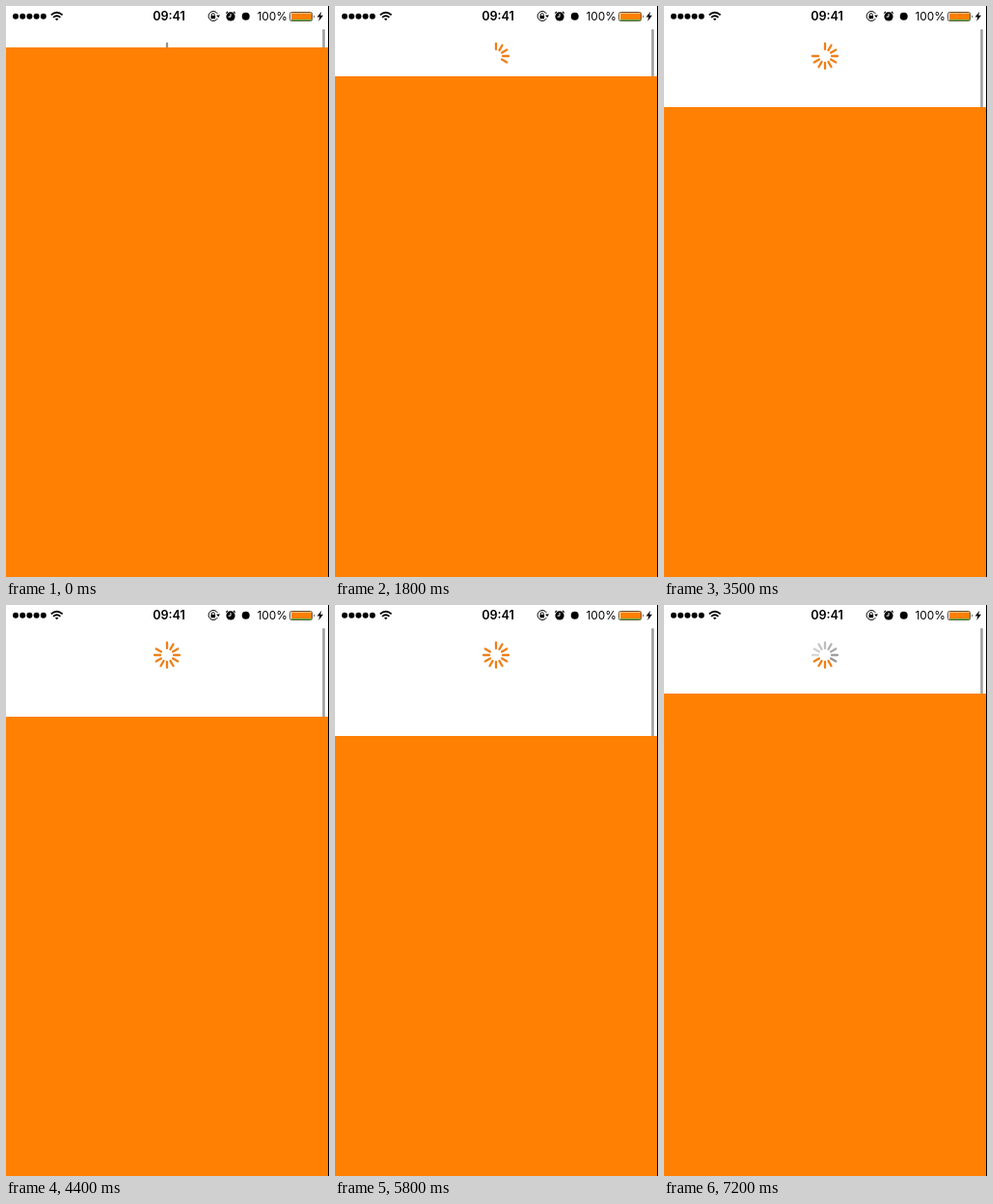
These frames come from a looping animation (335 px wide and 593 px high, 7300 ms). An HTML page:

```html
<!DOCTYPE html>
<html lang="en">
<head>
<meta charset="utf-8">
<title>Pull to refresh</title>
<style>
  html, body { margin: 0; width: 100%; height: 100%; overflow: hidden; background: #fff; }
  svg { display: block; }
  text { font: 11.8px Inter, Roboto, sans-serif; }
  .clock { font-size: 12.6px; font-weight: 600; }
  .line { fill: none; stroke: #000; }
</style>
</head>
<body>
<svg width="335" height="593" viewBox="0 0 335 593">
  <g id="spinner" stroke-width="2.3" stroke-linecap="round" transform="translate(167 52)"></g>
  <rect x="328.2" y="24" width="2.6" height="600" rx="1.3" fill="#a0a0a0"/>
  <rect id="content" width="335" height="593" fill="#ff8002"/>
  <rect x="334" width="1" height="593"/>

  <g id="signal"></g>
  <g class="line" stroke-width="1.8">
    <path d="M46.8 9.4Q52.7 4.2 58.6 9.4M49 11.9Q52.7 8.7 56.4 11.9"/>
    <path d="M50.9 13.3Q52.7 12 54.5 13.3L52.7 15.3Z" fill="#000" stroke="none"/>
  </g>
  <text class="clock" x="169" y="15.3" text-anchor="middle">09:41</text>

  <!-- rotation lock -->
  <path class="line" d="M219.4 8A5 5 0 1 0 219.4 13"/>
  <path d="M218.2 9.6h3.8l-1.9 2.6zM212.5 10h4.6v3.2h-4.6z"/>
  <path class="line" stroke-width=".9" d="M213.4 10.2V9a1.4 1.4 0 0 1 2.8 0v1.2"/>

  <!-- alarm -->
  <circle cx="233" cy="10.9" r="4.6"/>
  <path class="line" stroke-width="1.3" d="M228.3 7.6l1.7-1.7M237.7 7.6L236 5.9"/>
  <path style="fill:none;stroke:#fff" d="M233 8V11.2h-2.4"/>

  <circle cx="248.7" cy="10.7" r="4"/>
  <text x="291.8" y="15.1" text-anchor="end">100%</text>

  <!-- battery -->
  <rect x="294.5" y="6.5" width="23" height="9" rx="1.8" fill="#fff" stroke="#6b4a25"/>
  <rect x="296" y="7.5" width="21" height="7" fill="#ff8002"/>
  <path d="M296 14.8h21" stroke="#27a844"/>
  <path d="M319 9.2q1.6 1.8 0 3.6z"/>
  <path d="M327.3 5.8L322.6 11.4h2.8l-1.2 4.5 4.8-6.1h-2.9z"/>
</svg>
<script>
const LOOP = 7300, STEP = 100, TICKS = 12;
const REFRESH = 5900, RELEASE = 6400;
const ORANGE = "#ee7f18";
// the finger's slow drag as [time, top of the content]
const drag = [[0, 43], [1100, 58], [1800, 73], [3500, 105], [5300, 127], [REFRESH, 138]];

const $ = id => document.getElementById(id);
function add(parent, tag, attrs) {
  const node = document.createElementNS("http://www.w3.org/2000/svg", tag);
  for (const key in attrs) node.setAttribute(key, attrs[key]);
  return parent.appendChild(node);
}

for (let i = 0; i < 5; i++) add($("signal"), "circle", { cx: 10 + 7.2 * i, cy: 10.8, r: 3 });
const ticks = Array.from({ length: TICKS }, (_, i) =>
  add($("spinner"), "path", { d: "M0-7V-13", transform: `rotate(${i * 360 / TICKS})` }));

const clamp = u => Math.min(1, Math.max(0, u));
const smooth = u => (u = clamp(u), u * u * (3 - 2 * u));

function topAt(t) {
  let y = drag[0][1];
  for (let i = 1; i < drag.length; i++) {
    const [t0, y0] = drag[i - 1], [t1, y1] = drag[i];
    y += (y1 - y0) * clamp((t - t0) / (t1 - t0));
  }
  // jump open when refreshing starts, settle after release
  return y + 50 * smooth((t - REFRESH) / 400) - 96 * smooth((t - RELEASE) / 600);
}

function spinColor(i, t) {
  const head = Math.round((t - REFRESH) / 64);
  const age = (head - i + TICKS) % TICKS;
  const fade = clamp((t - REFRESH) / 1000);
  if (age < 4 || age < TICKS * (1 - 1.5 * fade)) return ORANGE;
  const grey = Math.round(140 + (age - 3) * 9.5 * fade);
  return `rgb(${grey},${grey},${grey + 3})`;
}

function draw(t) {
  const top = topAt(t);
  const spinning = t > REFRESH;
  const shown = spinning ? TICKS : Math.min(TICKS - 1, Math.floor(1 + (top - 43) / 6.8));
  ticks.forEach((tick, i) => {
    tick.setAttribute("visibility", i < shown ? "visible" : "hidden");
    tick.setAttribute("stroke", spinning ? spinColor(i, t) : top < 48 ? "#929292" : ORANGE);
  });
  $("content").setAttribute("y", Math.round(top));
}

const start = performance.now();
function frame() {
  const t = (performance.now() - start) % LOOP;
  draw(Math.floor(t / STEP) * STEP);
  requestAnimationFrame(frame);
}
frame();
</script>
</body>
</html>
```
